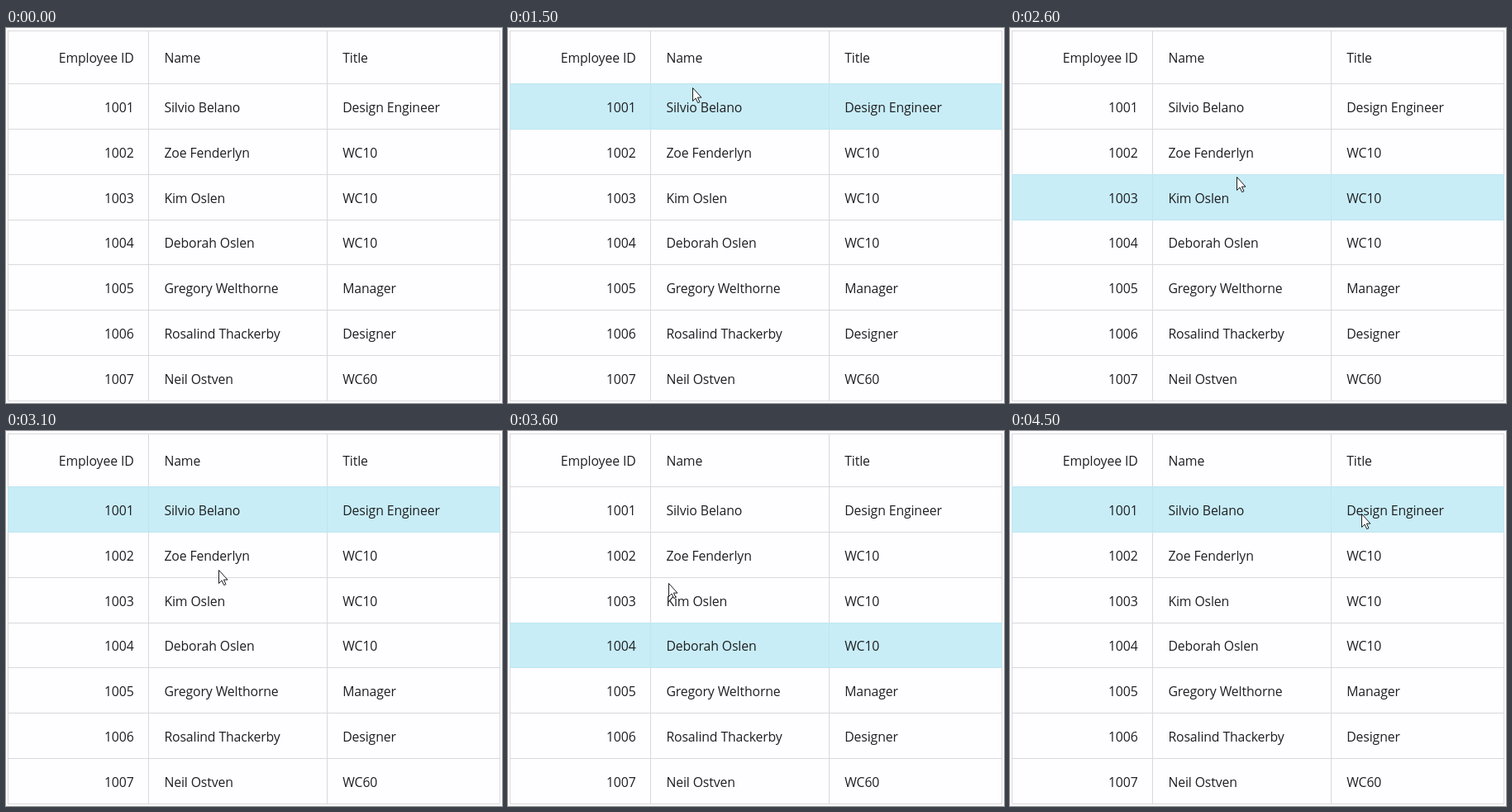
These frames come from a looping animation (600x454 px, 4.6 s). An HTML page:

```html
<!DOCTYPE html>
<html lang="en">
<head>
<meta charset="utf-8">
<title>Employee table</title>
<style>
  html, body { margin: 0; width: 100%; height: 100%; overflow: hidden; background: #fefdff; }
  svg { display: block; width: 600px; height: 454px; }
  text { font: 15.8px "Open Sans", "Noto Sans", sans-serif; letter-spacing: -0.12px; fill: #1f1f22; }
</style>
</head>
<body>
<svg id="stage" viewBox="0 0 600 454"></svg>
<script>
const LOOP = 4600, STEP = 100, ENTER = 1200, LAG = 90;
const TOP = 67, ROW = 54.85, LEFT = 2, RIGHT = 598;

const people = [
  ["Silvio Belano", "Design Engineer"],
  ["Zoe Fenderlyn", "WC10"],
  ["Kim Oslen", "WC10"],
  ["Deborah Oslen", "WC10"],
  ["Gregory Welthorne", "Manager"],
  ["Rosalind Thackerby", "Designer"],
  ["Neil Ostven", "WC60"]
];

// Turning points of the pointer: time, x, y
const path = [
  [ENTER, 588, 96], [1500, 223, 72], [1700, 228, 168], [2100, 268, 316],
  [2300, 274, 344], [2600, 274, 180], [2900, 262, 84], [3100, 257, 168],
  [3400, 222, 350], [3600, 194, 184], [3800, 200, 98], [4400, 500, 100],
  [4500, 425, 100]
];

const stage = document.getElementById("stage");
const rowY = (i, base = TOP) => Math.round(base + i * ROW);

function add(tag, attrs, label) {
  const el = document.createElementNS("http://www.w3.org/2000/svg", tag);
  for (const key in attrs) el.setAttribute(key, attrs[key]);
  if (label) el.textContent = label;
  stage.appendChild(el);
  return el;
}

function box(x, y, width, height, fill) {
  return add("rect", { x, y, width, height, fill, "shape-rendering": "crispEdges" });
}

function writeRow(id, name, title, y) {
  add("text", { x: 154.6, y, "text-anchor": "end" }, id);
  add("text", { x: 191.4, y }, name);
  add("text", { x: 407.2, y }, title);
}

const line = "#d9d9dd";
for (let i = 0; i <= people.length; i++) box(LEFT, rowY(i), RIGHT - LEFT, 1, line);
box(LEFT, 3, RIGHT - LEFT, 1, line);
for (const x of [LEFT, 172, 388, RIGHT - 1]) box(x, 3, 1, 449, line);

// Translucent, so the grid stays faintly visible below it
const glow = box(LEFT, TOP, RIGHT - LEFT, ROW, "#bbeaf5");
glow.setAttribute("fill-opacity", 0.8);

writeRow("Employee ID", "Name", "Title", 42);
people.forEach(([name, title], i) => writeRow(1001 + i, name, title, rowY(i, 101.8)));

const pointer = add("path", {
  d: "M0.5 0.5V16.5L4 13L6.7 18.6L9 17.6L6.4 12.1H11Z",
  fill: "#fff", stroke: "#1c1c1e", "stroke-width": 1, "stroke-linejoin": "round"
});

function slope(i, axis) {
  const a = path[Math.max(i - 1, 0)], b = path[Math.min(i + 1, path.length - 1)];
  return (b[axis] - a[axis]) / (b[0] - a[0]);
}

// Smooth cubic through the path points
function locate(t) {
  let i = 0;
  while (i < path.length - 2 && t >= path[i + 1][0]) i++;
  const a = path[i], b = path[i + 1], span = b[0] - a[0];
  const u = (t - a[0]) / span, v = 1 - u;
  return [1, 2].map(k =>
    v * v * (1 + 2 * u) * a[k] + u * u * (3 - 2 * u) * b[k] +
    span * u * v * (v * slope(i, k) - u * slope(i + 1, k)));
}

function draw(time) {
  const t = Math.floor((time % LOOP) / STEP) * STEP;
  const shown = t >= ENTER ? "visible" : "hidden";
  pointer.setAttribute("visibility", shown);
  glow.setAttribute("visibility", shown);
  if (t < ENTER) return;

  const [x, y] = locate(t);
  pointer.setAttribute("transform", `translate(${Math.round(x)} ${Math.round(y)})`);

  // The highlight trails the pointer
  const hoverY = locate(Math.max(ENTER, t - LAG))[1];
  const row = Math.floor((hoverY - TOP) / ROW);
  glow.setAttribute("y", rowY(row));
  glow.setAttribute("height", rowY(row + 1) - rowY(row) + 1);
}

const start = performance.now();
function tick() {
  draw(performance.now() - start);
  requestAnimationFrame(tick);
}
tick();
</script>
</body>
</html>
```
